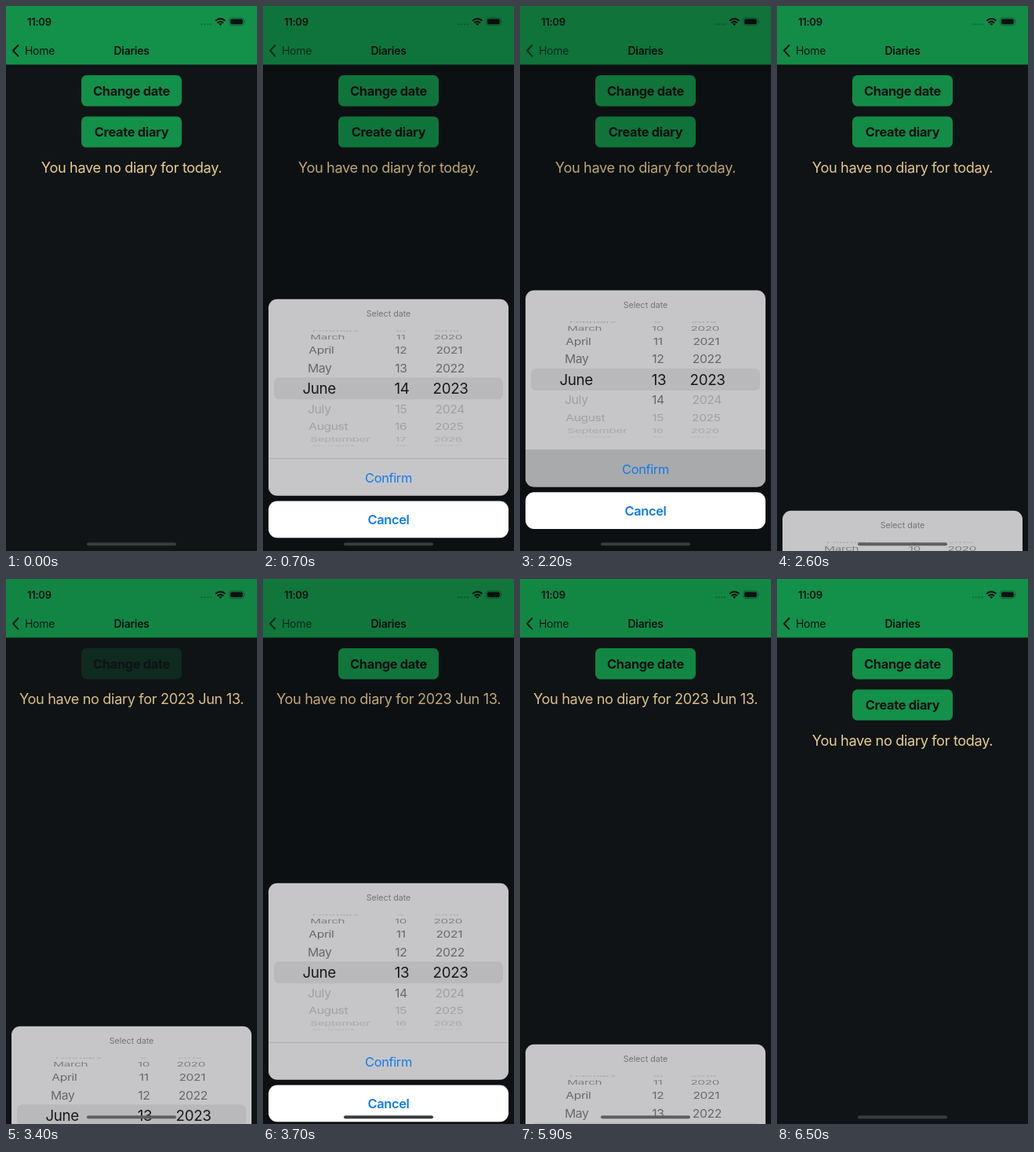
Animation, 320 px wide and 693 px high, one loop 6600 ms. Source, as an HTML page:

```html
<!DOCTYPE html>
<html lang="en">
<head>
<meta charset="utf-8">
<title>Diaries</title>
<style>
  html, body { margin: 0; width: 100%; height: 100%; overflow: hidden; background: #101417; }
  svg { display: block; width: 100vw; height: 100vh; }
  text { font-family: Inter, "Liberation Sans", sans-serif; white-space: pre; }
</style>
</head>
<body>
<svg id="stage" viewBox="0 0 320 693">
  <defs>
    <clipPath id="band"><rect x="14" y="461" width="292" height="28"/></clipPath>
    <clipPath id="rest"><path d="M7 401H313V461H7ZM7 489H313V550H7Z"/></clipPath>
    <clipPath id="card"><rect x="7" y="361.5" width="306" height="250" rx="11"/></clipPath>
  </defs>
  <g id="page"></g>
  <rect id="dim" width="320" height="693" fill="#000"/>
  <g id="sheet"></g>
  <rect id="bar" x="103" y="682.3" width="114" height="4" rx="2"/>
</svg>
<script>
const LOOP = 6600, TRAVEL = 332, MID = 475;
const GREEN = "#139049", INK = "#0c1213", BLUE = "#127be8";
const $ = id => document.getElementById(id);
const clamp = (v, a = 0, b = 1) => Math.min(b, Math.max(a, v));

function add(parent, tag, attrs, content) {
  const el = document.createElementNS("http://www.w3.org/2000/svg", tag);
  for (const k in attrs) el.setAttribute(k, attrs[k]);
  if (content) el.textContent = content;
  parent.appendChild(el);
  return el;
}

// Text whose capitals are centred on cy
function label(parent, x, cy, content, size, { weight = 400, fill = INK, anchor = "middle", track = -0.02 } = {}) {
  return add(parent, "text", {
    x, y: cy + size * 0.363, "font-size": size, "font-weight": weight,
    fill, "text-anchor": anchor, "letter-spacing": track * size
  }, content);
}

const page = $("page"), sheet = $("sheet");

// Header
add(page, "rect", { width: 320, height: 693, fill: "#101417" });
add(page, "rect", { width: 320, height: 74.5, fill: GREEN });
label(page, 27, 20.3, "11:09", 13, { weight: 600, anchor: "start" });
for (let i = 0; i < 4; i++)
  add(page, "circle", { cx: 249.8 + i * 3.8, cy: 23.2, r: 1, fill: INK, opacity: 0.35 });
const wifi = add(page, "g", { fill: "none", stroke: INK, "stroke-width": 2.1 });
add(wifi, "path", { d: "M267.2 18.8Q273.3 13.3 279.4 18.8" });
add(wifi, "path", { d: "M269.5 21.5Q273.3 18.2 277.1 21.5" });
add(wifi, "path", { d: "M273.3 25L271.2 22.9Q273.3 21.2 275.4 22.9Z", fill: INK, stroke: "none" });
add(page, "rect", { x: 284.6, y: 15.1, width: 18.6, height: 9.6, rx: 3, fill: "none", stroke: INK, "stroke-opacity": 0.4, "stroke-width": 0.9 });
add(page, "rect", { x: 286, y: 16.5, width: 15.8, height: 6.8, rx: 1.8, fill: INK });
add(page, "path", { d: "M304.2 18.3Q306 19.9 304.2 21.5Z", fill: INK, opacity: 0.45 });
const back = add(page, "g", {});
add(back, "path", { d: "M15.4 50L9 56.8L15.4 63.6", fill: "none", stroke: INK, "stroke-width": 2, "stroke-linecap": "round", "stroke-linejoin": "round" });
label(back, 24, 56.8, "Home", 14, { anchor: "start" });
label(page, 160, 56.8, "Diaries", 14, { weight: 600 });

// Page body
function button(y, name) {
  const g = add(page, "g", {});
  add(g, "rect", { x: 96, y, width: 128, height: 39.4, rx: 6.5, fill: GREEN });
  label(g, 160, y + 19.8, name, 16.4, { weight: 700 });
  return g;
}
const change = button(88, "Change date");
const create = button(140.4, "Create diary");
const note = { fill: "#ebce8e" };
const today = label(page, 160, 205, "You have no diary for today.", 18.2, note);
const other = label(page, 160, 152.6, "You have no diary for 2023 Jun 13.", 18.2, note);

// Date sheet
add(sheet, "rect", { x: 7, y: 361.5, width: 306, height: 250, rx: 11, fill: "#c6c6c9" });
add(sheet, "rect", { x: 14, y: 461, width: 292, height: 28, rx: 6.5, fill: "#b9b9bc" });
label(sheet, 160, 380, "Select date", 10.7, { fill: "#747477", track: 0 });
const flash = add(sheet, "rect", { x: 7, y: 564.5, width: 306, height: 47, fill: "#a9aaac", "clip-path": "url(#card)" });
add(sheet, "rect", { x: 7, y: 564, width: 306, height: 0.8, fill: "#a9a9ac" });
label(sheet, 160, 588.6, "Confirm", 16.4, { fill: BLUE });
add(sheet, "rect", { x: 7, y: 618.3, width: 306, height: 46.7, rx: 11, fill: "#fff" });
label(sheet, 160, 642, "Cancel", 16.4, { fill: BLUE, weight: 600 });

const MONTHS = ["January", "February", "March", "April", "May", "June", "July", "August", "September", "October", "November", "December"];
const outer = add(sheet, "g", { "clip-path": "url(#rest)" });
const inner = add(sheet, "g", { "clip-path": "url(#band)" });

// A drum of rows; the row in the band is shown larger
function wheel(x, bigX, anchor, last, name) {
  const make = (parent, size) => label(parent, 0, 0, "", size, { fill: "#000", anchor });
  const small = Array.from({ length: 9 }, () => make(outer, 15.8));
  const big = Array.from({ length: 3 }, () => make(inner, 18.8));
  const STEP = 0.36, R = 73.8;
  const place = (el, value, angle, cx, opacity, zoom) => {
    el.textContent = name(value);
    el.setAttribute("transform", `translate(${cx} ${MID + R * Math.sin(angle)}) scale(${zoom} ${Math.cos(angle)})`);
    el.setAttribute("opacity", opacity);
  };
  return pos => {
    const base = Math.round(pos);
    small.forEach((el, i) => {
      const value = base + i - 4, angle = clamp((value - pos) * STEP, -1.56, 1.56);
      const cos = Math.cos(angle), zoom = 1 - (1 - cos) * 0.07;
      const fade = clamp(0.25 + cos * 1.1);
      place(el, value, angle, 160 + (x - 160) * zoom, (value > last ? 0.19 : 0.48) * fade, zoom);
    });
    big.forEach((el, i) => {
      const value = base + i - 1;
      place(el, value, (value - pos) * STEP, bigX, value > last ? 0.3 : 0.87, 1);
    });
  };
}
wheel(56.5, 50.5, "start", 5, v => MONTHS[v])(5);
wheel(238.7, 239, "middle", 2023, String)(2023);
const turnDay = wheel(176, 177, "middle", 14, String);

// Remaining share of a critically damped move
function left(t, start) {
  const u = Math.max(0, t - start) * 0.00975;
  return (1 + u) * Math.exp(-u);
}
const smooth = (t, a, b) => {
  const u = clamp((t - a) / (b - a));
  return u * u * (3 - 2 * u);
};

const ROUNDS = [
  { press: 100, open: 167, roll: 1150, tap: 2150, close: 2260, end: 2800 },
  { press: 3200, open: 3267, roll: 4240, tap: 5540, close: 5654, end: 6450 }
];

function draw(t) {
  const r = ROUNDS[t < 3100 ? 0 : 1];
  const up = t >= r.end ? 0 : t < r.close ? 1 - left(t, r.open) : left(t, r.close);
  const dated = t >= 2760 && t < 6154;

  create.setAttribute("visibility", dated ? "hidden" : "visible");
  today.setAttribute("visibility", dated ? "hidden" : "visible");
  other.setAttribute("visibility", dated ? "visible" : "hidden");
  change.setAttribute("opacity", 1 - 0.8 * (smooth(t, r.press, r.press + 150) - smooth(t, r.press + 210, r.press + 460)));

  $("dim").setAttribute("opacity", 0.2 * up);
  back.setAttribute("opacity", 1 - 0.3 * up);
  const dy = TRAVEL * (1 - up);
  sheet.setAttribute("transform", `translate(0 ${dy})`);
  sheet.setAttribute("visibility", up > 0 ? "visible" : "hidden");
  flash.setAttribute("opacity", t < r.tap ? 0 : 1 - smooth(t, r.close + 60, r.close + 300));
  $("bar").setAttribute("fill", dy > 72 && dy < 323 ? "#5f5f61" : "#393c3e");

  const turned = smooth(t, r.roll, r.roll + 700);
  turnDay(r === ROUNDS[0] ? 14 - turned : 13 + turned);
}

function tick() {
  draw(performance.now() % LOOP);
  requestAnimationFrame(tick);
}
tick();
</script>
</body>
</html>
```
